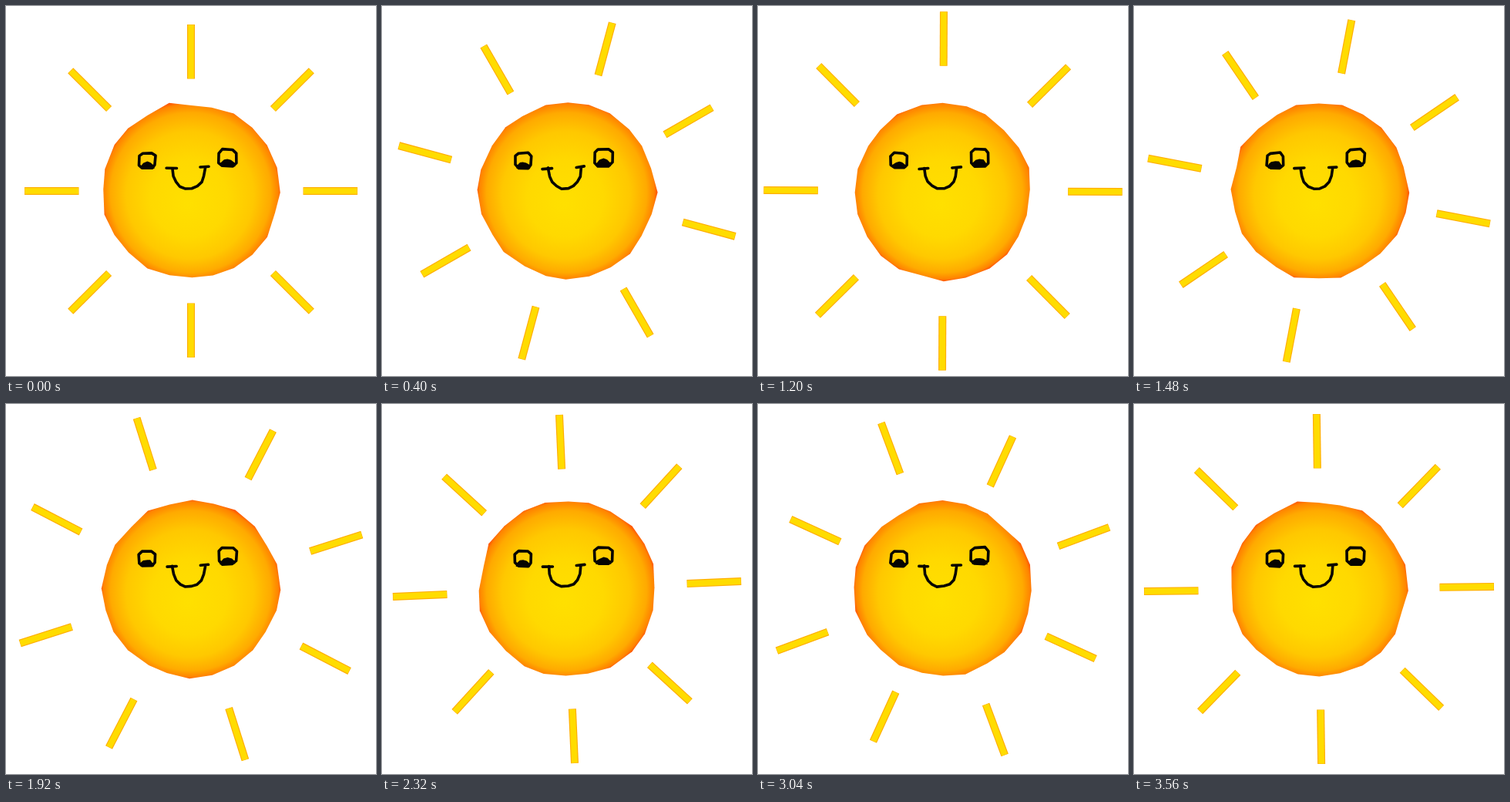
Write an HTML page with a canvas that moves like this. It is 480 px wide and 480 px high and loops after 3600 ms.

```html
<!DOCTYPE html>
<html lang="en">
<head>
<meta charset="utf-8">
<title>Smiling sun</title>
<style>
  html, body { margin: 0; width: 100%; height: 100%; overflow: hidden; background: #fff; }
  canvas { display: block; width: 480px; height: 480px; }
</style>
</head>
<body>
<canvas id="stage" width="480" height="480"></canvas>
<script>
const ctx = document.getElementById('stage').getContext('2d');
const LOOP = 3600, STEP = 40, STEPS = LOOP / STEP, TAU = Math.PI * 2;
const INK = '#060402', CORNERS = 24, RAYS = 8, RAY_LENGTH = 70.5;
const TURN = 1.508 * Math.PI / 180; // ray rotation per step
const SWING = 11;                   // how far rays shoot out between poses

// Poses: step, then the reach of the two alternating sets of rays.
const POSES = [[0, 216, 221], [10, 226, 217], [23, 219.4, 217.5], [37, 216.6, 225.8],
  [58, 226.2, 216], [76, 217.5, 230], [89, 221.4, 227]];

const rand = n => {
  const s = Math.sin(n * 127.1 + 11.7) * 43758.5453;
  return s - Math.floor(s);
};

// Ease from pose to pose, swinging outwards on the way.
function reach(set, k) {
  const i = POSES.findIndex(pose => pose[0] >= k) || 1;
  const a = POSES[i - 1], b = POSES[i];
  const u = (k - a[0]) / (b[0] - a[0]);
  const ease = (1 - Math.cos(Math.PI * u)) / 2;
  return a[set] + (b[set] - a[set]) * ease + SWING * Math.sin(Math.PI * u) ** 2;
}

function trace(points, close) {
  ctx.beginPath();
  points.forEach(([x, y]) => ctx.lineTo(x, y));
  if (close) ctx.closePath();
}

// Points on part of an ellipse; a power below 1 makes it squarer.
function arc(cx, cy, rx, ry, from, to, count, power = 1) {
  const bend = v => Math.sign(v) * Math.abs(v) ** power;
  return Array.from({ length: count + 1 }, (_, i) => {
    const a = from + (to - from) * i / count;
    return [cx + rx * bend(Math.cos(a)), cy + ry * bend(Math.sin(a))];
  });
}

function drawRay(angle, outer) {
  ctx.save();
  ctx.translate(240, 240);
  ctx.rotate(angle);
  ctx.fillStyle = '#ffae00';
  ctx.fillRect(-5, -outer, 10, RAY_LENGTH);
  ctx.fillStyle = '#ffdc00';
  ctx.fillRect(-3.8, -outer + 0.5, 7.6, RAY_LENGTH - 1);
  ctx.restore();
}

function drawBody(k) {
  const turn = TAU * k / STEPS;
  const wave = (n, seed) => Math.sin(turn * n + rand(seed) * TAU);
  const corners = [];
  for (let i = 0; i < CORNERS; i++) {
    const r = 114.4 + 1.8 * wave(5 + i % 4, i) + 1.4 * wave(9 + i % 5, i + 50);
    const a = TAU * i / CORNERS + 0.02 * wave(7 + i % 3, i + 90);
    corners.push([240 + r * Math.sin(a), 240 - r * Math.cos(a)]);
  }
  const glow = ctx.createRadialGradient(236, 258, 0, 240, 240, 118);
  glow.addColorStop(0, '#ffe000');
  glow.addColorStop(0.42, '#ffd900');
  glow.addColorStop(0.7, '#ffc800');
  glow.addColorStop(0.88, '#ffaa00');
  glow.addColorStop(0.96, '#ff8400');
  glow.addColorStop(1, '#ff4600');
  ctx.fillStyle = glow;
  trace(corners, true);
  ctx.fill();
}

function drawFace(k) {
  const boil = Math.floor(k / 2) * 100;
  const wobble = (points, seed) => points.map(([x, y], i) => [
    x + (rand(boil + seed + i) - 0.5) * 1.4,
    y + (rand(boil + seed + i + 0.5) - 0.5) * 1.4
  ]);
  const line = (points, seed) => {
    trace(wobble(points, seed), false);
    ctx.stroke();
  };
  const eye = (cx, cy, r, seed) => {
    const tilt = TAU / 16;
    trace(wobble(arc(cx, cy, r, r - 0.7, tilt, tilt + TAU * 7 / 8, 7, 0.6), seed), true);
    ctx.stroke();
    const height = 8.5 + 2 * rand(boil + seed);
    trace(wobble(arc(cx, cy + r - 1, r - 2, height, Math.PI, TAU, 6), seed + 20), true);
    ctx.fill();
  };

  ctx.strokeStyle = ctx.fillStyle = INK;
  ctx.lineWidth = 3.6;
  ctx.lineCap = ctx.lineJoin = 'round';
  eye(183, 200.5, 11, 3);
  eye(287.5, 196.8, 12, 37);
  line(arc(237, 210.5, 21, 26.5, Math.PI, 0, 9, 0.9), 70);
  line([[208.5, 211], [221, 210.5]], 82);
  line([[252, 209.5], [263, 208.5]], 86);
}

function draw(k) {
  ctx.fillStyle = '#fff';
  ctx.fillRect(0, 0, 480, 480);
  for (let i = 0; i < RAYS; i++) {
    drawRay(TAU * i / RAYS + k * TURN, reach(1 + i % 2, k));
  }
  drawBody(k);
  drawFace(k);
}

const start = performance.now();
function tick() {
  const t = (performance.now() - start) % LOOP;
  draw(Math.floor(t / STEP));
  requestAnimationFrame(tick);
}
tick();
</script>
</body>
</html>
```
